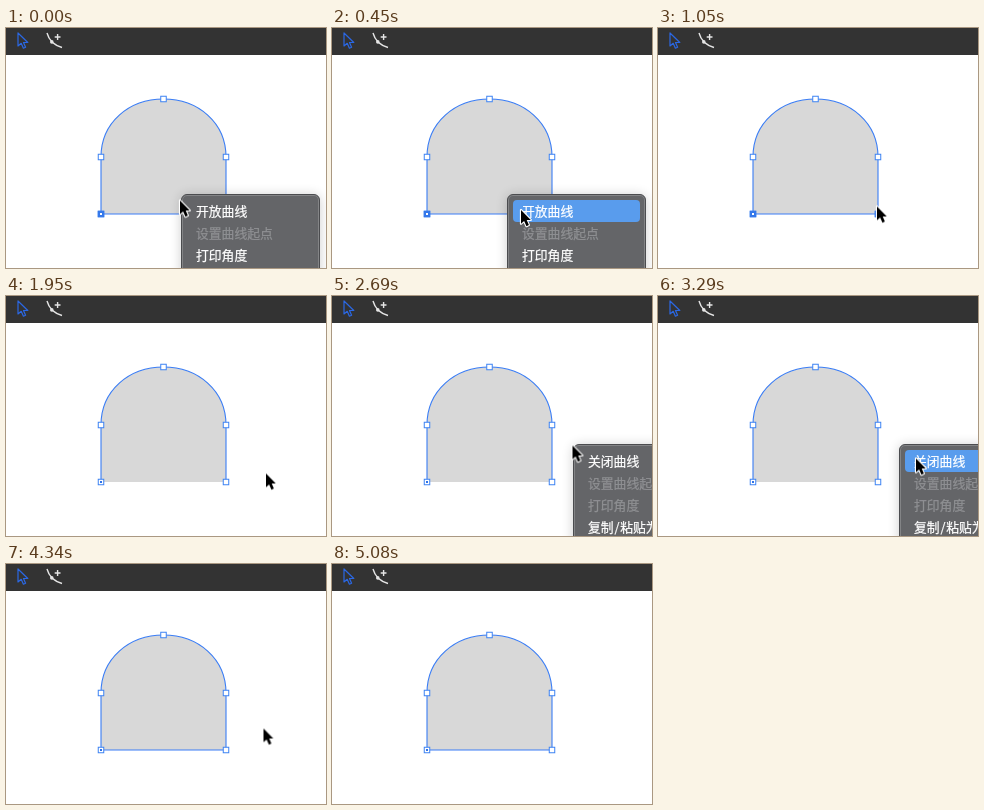
Write an HTML page that moves like this. It is 320 px wide and 240 px high and loops after 5.38 s.

```html
<!DOCTYPE html>
<html lang="zh-CN">
<head>
<meta charset="utf-8">
<title>Open and close a path</title>
<style>
  html, body { margin: 0; width: 100%; height: 100%; overflow: hidden; background: #fff; }
  #stage { position: relative; width: 320px; height: 240px; overflow: hidden; background: #fff; }
  svg { position: absolute; left: 0; top: 0; display: block; }

  .anim { animation: 5380ms step-end infinite; }

  .handle { fill: #fff; stroke: #3d83f3; }
  .outline { fill: none; stroke: #3a7df5; stroke-width: 1.1; }

  .menu {
    position: absolute; box-sizing: border-box; height: 130px;
    background: #646568; border: 1px solid #4b4c4f; border-radius: 6px;
    box-shadow: inset 0 0 0 1px rgba(255, 255, 255, .2), 0 1px 12px rgba(0, 0, 0, .2);
    font: 500 12.8px/22px "Noto Sans CJK SC", "Noto Sans CJK", sans-serif;
    -webkit-text-stroke: .25px; color: #fff; white-space: nowrap;
  }
  .menu div { position: absolute; left: 14px; height: 22px; }
  .menu .off { color: #8f9093; }
  .menu .hot { left: 5px; top: 5px; width: 127px; border-radius: 4px; background: #599ced; }
  .menu div:nth-child(2) { top: 5px; }
  .menu div:nth-child(3) { top: 27px; }
  .menu div:nth-child(4) { top: 49px; }
  .menu div:nth-child(5) { top: 71px; }
  .menu span { margin: 0 .8px; }

  #openMenu { left: 175px; top: 166px; width: 139px; animation-name: open-menu; }
  #openMenu .hot { animation-name: open-hot; }
  #closeMenu { left: 241px; top: 148px; width: 151px; animation-name: close-menu; }
  #closeMenu .hot { width: 139px; animation-name: close-hot; }
  #edge { animation-name: edge; }
  #picked { animation-name: picked; }
  #cursor { animation-name: cursor; }

  @keyframes open-menu {
    0% { opacity: 1; } 16.728% { opacity: .6; } 19.516%, 100% { opacity: 0; }
  }
  @keyframes open-hot {
    0% { opacity: 0; } 2.788%, 100% { opacity: 1; }
  }
  @keyframes close-menu {
    0% { opacity: 0; } 50% { opacity: 1; } 72.304% { opacity: .15; } 75.092%, 100% { opacity: 0; }
  }
  @keyframes close-hot {
    0% { opacity: 0; } 58.364% { opacity: 1; } 69.516% { opacity: 0; } 72.304%, 100% { opacity: 1; }
  }
  @keyframes edge {
    0% { opacity: 1; } 22.304% { opacity: 0; } 75.092%, 100% { opacity: 1; }
  }
  @keyframes picked {
    0% { opacity: 1; } 36.245%, 100% { opacity: 0; }
  }
  @keyframes cursor {
    0% { transform: translate(174px, 172.5px); }
    2.788% { transform: translate(177.5px, 176px); }
    5.576% { transform: translate(188px, 182px); }
    8.364% { transform: translate(189px, 182px); }
    19.516% { transform: translate(219px, 178.5px); }
    22.304% { transform: translate(259.5px, 178px); }
    25.092% { transform: translate(260px, 177.5px); }
    38.847% { transform: translate(258px, 174px); }
    41.635% { transform: translate(246.5px, 165px); }
    44.423% { transform: translate(240.5px, 153px); }
    47.211% { transform: translate(239.5px, 150px); }
    50% { transform: translate(240.5px, 149.5px); }
    55.576% { transform: translate(240.5px, 150px); }
    58.364% { transform: translate(254.5px, 161px); }
    61.152% { transform: translate(258px, 162.5px); }
    80.669% { transform: translate(257.5px, 164.5px); }
    83.271% { transform: translate(257px, 201.5px); }
    86.059% { transform: translate(256.5px, 235px); }
    88.847% { transform: translate(256.5px, 239.5px); }
    94.423%, 100% { transform: translate(256.5px, 260px); }
  }
</style>
</head>
<body>
<div id="stage">
  <svg width="320" height="240" viewBox="0 0 320 240">
    <defs>
      <rect id="box" x="-2.75" y="-2.75" width="5.5" height="5.5"/>
      <path id="arch" d="M95 186V129C95 94.5 123 71 157.5 71S220 94.5 220 129V186"/>
    </defs>

    <!-- toolbar -->
    <rect width="320" height="27" fill="#333"/>
    <path d="M12 5V18L15.2 15.3L17.4 20.2L19.6 19.2L17.5 14.5H21.8Z"
          fill="none" stroke="#2b68e4" stroke-width="1.2" stroke-linejoin="round"/>
    <g fill="none" stroke="#e6e6e6" stroke-width="1.4">
      <path d="M41 5Q44 16 56 19.5M48.7 9H54.5M51.6 6.1V11.9"/>
      <circle cx="45.8" cy="13.9" r="1.8" fill="#e6e6e6" stroke="none"/>
    </g>

    <!-- path -->
    <use href="#arch" fill="#d8d8d8"/>
    <use href="#arch" class="outline"/>
    <path id="edge" class="outline anim" d="M95 186H220"/>
    <g class="handle">
      <use href="#box" x="157.5" y="71"/>
      <use href="#box" x="95" y="129"/>
      <use href="#box" x="220" y="129"/>
      <use href="#box" x="95" y="186"/>
      <use href="#box" x="220" y="186"/>
    </g>
    <rect x="94" y="185" width="2" height="2" fill="#2f72e8"/>
    <g id="picked" class="anim">
      <g fill="#3377ea" stroke="#3377ea">
        <use href="#box" x="95" y="186"/>
        <use href="#box" x="220" y="186"/>
      </g>
      <rect x="94" y="185" width="2" height="2" fill="#fff"/>
    </g>
  </svg>

  <div id="openMenu" class="menu anim">
    <div class="hot anim"></div>
    <div>开放曲线</div>
    <div class="off">设置曲线起点</div>
    <div>打印角度</div>
  </div>

  <div id="closeMenu" class="menu anim">
    <div class="hot anim"></div>
    <div>关闭曲线</div>
    <div class="off">设置曲线起点</div>
    <div class="off">打印角度</div>
    <div>复制<span>/</span>粘贴为</div>
  </div>

  <svg width="320" height="240" viewBox="0 0 320 240">
    <path id="cursor" class="anim" d="M0 0V13.8L3.1 11L5.5 16.2L7.9 15.1L5.7 10H9.8Z"
          fill="#000" stroke="#fff" stroke-width="2.2" stroke-linejoin="round" paint-order="stroke"/>
  </svg>
</div>
</body>
</html>
```
